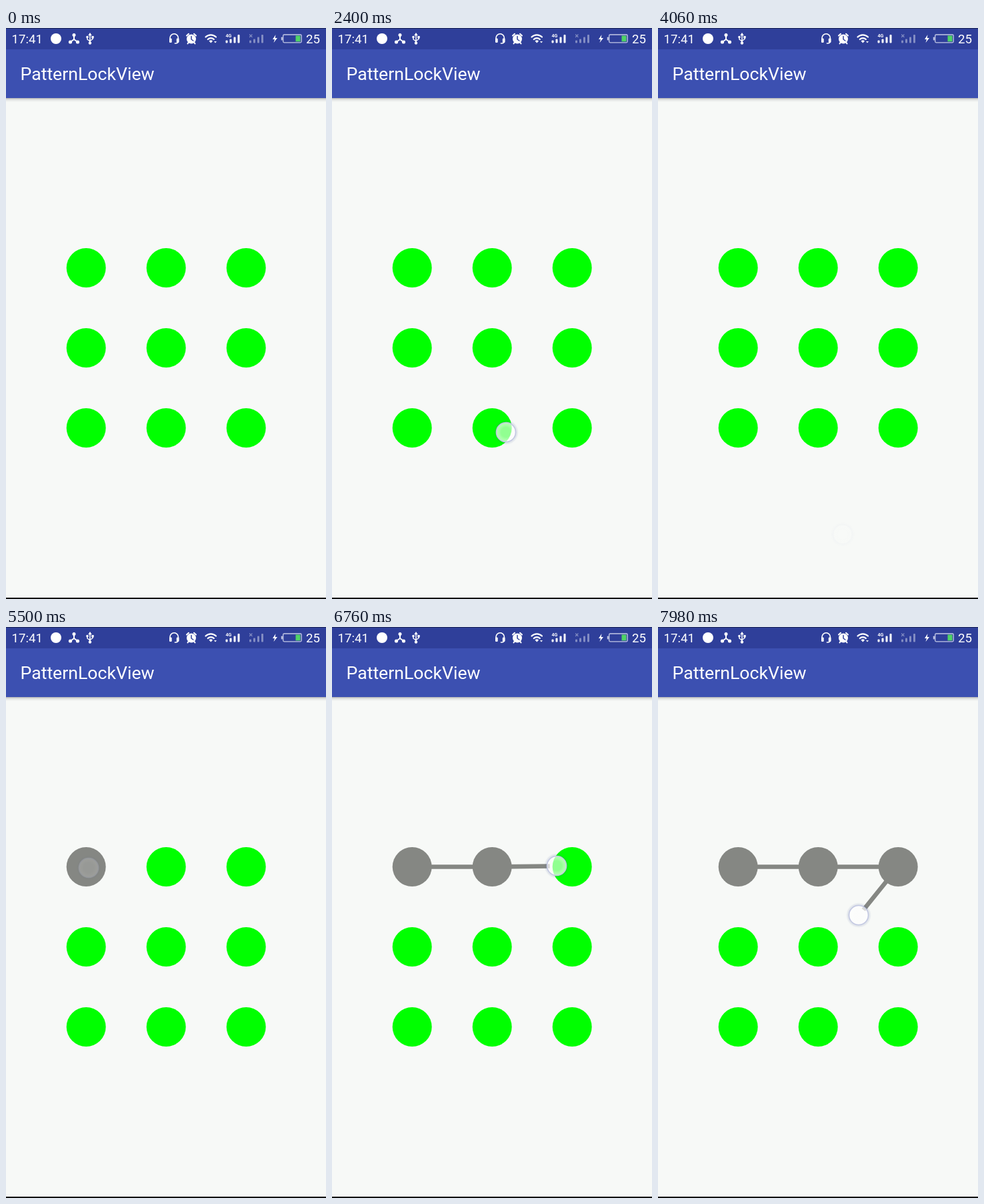
Animation, 480 px wide and 856 px high, one loop 8 s. Source, as an HTML page:

```html
<!DOCTYPE html>
<html lang="en">
<head>
<meta charset="utf-8">
<title>Pattern lock</title>
<style>
  html, body { margin: 0; height: 100%; overflow: hidden; background: #f7f9f7; }
  svg { display: block; width: 100vw; height: 100vh; }
  text { font-family: Roboto, sans-serif; fill: #fff; }
  .status { font-size: 18.67px; }
  .title { font-size: 26.67px; }
  .line { fill: none; stroke: #fff; stroke-linecap: round; stroke-linejoin: round; }
  #trail { fill: none; stroke: #858783; stroke-width: 6.6; }
</style>
</head>
<body>
<svg viewBox="0 0 480 856">
  <defs>
    <linearGradient id="shadow" x2="0" y2="1">
      <stop offset="0" stop-color="#000" stop-opacity=".27"/>
      <stop offset=".4" stop-color="#000" stop-opacity=".09"/>
      <stop offset="1" stop-color="#000" stop-opacity="0"/>
    </linearGradient>
    <radialGradient id="halo">
      <stop offset=".7" stop-color="#4a5f9a" stop-opacity=".25"/>
      <stop offset="1" stop-color="#4a5f9a" stop-opacity="0"/>
    </radialGradient>
    <radialGradient id="glass">
      <stop offset=".5" stop-color="#fff" stop-opacity=".57"/>
      <stop offset="1" stop-color="#fff" stop-opacity=".75"/>
    </radialGradient>
    <mask id="ringOnly">
      <circle r="19" fill="#fff"/><circle r="14" fill="#000"/>
    </mask>
  </defs>

  <rect width="480" height="856" fill="#f7f9f7"/>
  <rect y="105" width="480" height="6" fill="url(#shadow)"/>
  <rect y="32" width="480" height="73" fill="#3c50b1"/>
  <rect width="480" height="32" fill="#2f3f9a"/>
  <rect width="480" height="1" fill="#1c2558"/>
  <rect y="854" width="480" height="2"/>
  <text class="title" x="21.5" y="78">PatternLockView</text>

  <g fill="#fff">
    <text class="status" x="8.5" y="23">17:41</text>
    <text class="status" x="450" y="23">25</text>
    <circle cx="75" cy="16" r="8"/>

    <!-- three linked nodes -->
    <path class="line" stroke-width="2" d="M102 10v7l-5.5 4M102 17l5.5 4"/>
    <circle cx="102" cy="10.5" r="2.5"/>
    <circle cx="96.5" cy="21" r="2.6"/>
    <circle cx="107.5" cy="21" r="2.6"/>

    <!-- cable -->
    <path class="line" stroke-width="1.5" d="M126 10v12M122 14v3l4 3M130 14v2.500l-4 3"/>
    <path d="M126 7l2.800 4.200h-5.600z"/>
    <circle cx="126" cy="22.500" r="2.200"/>
    <circle cx="122" cy="13.500" r="1.800"/>
    <path d="M128.300 12h3.400v3.400h-3.400z"/>

    <!-- headset -->
    <path class="line" stroke-width="1.600" d="M246 17v-2a6.200 6.200 0 0 1 12.400 0v5q0 3-5 3"/>
    <rect x="245" y="15.500" width="3.700" height="6.500" rx="1.300"/>
    <rect x="255.800" y="15.500" width="3.700" height="6.500" rx="1.300"/>

    <!-- alarm -->
    <circle cx="278" cy="16.500" r="7"/>
    <path class="line" stroke-width="2" d="M271 11.500l3-2.800M285 11.500l-3-2.800M273.500 22l-1 1.500M282.500 22l1 1.500"/>
    <path class="line" style="stroke:#2f3f9a" stroke-width="1.500" d="M278 12.500v4.500l2.800 2"/>

    <!-- wireless -->
    <path class="line" stroke-width="2.300" d="M299.500 13.500a11 11 0 0 1 15.500 0M302.800 17a6.300 6.300 0 0 1 9 0"/>
    <path d="M304.500 19.500a4 4 0 0 1 5.600 0l-2.800 3z"/>
    <path d="M312 20h4l-2 2.500z"/>

    <!-- signal -->
    <text x="329.500" y="14" font-size="7" font-weight="700">4G</text>
    <g id="bars">
      <rect x="329.500" y="18.500" width="3" height="4" rx="1"/>
      <rect x="335.500" y="16.500" width="3" height="6" rx="1"/>
      <rect x="341.500" y="13.500" width="3" height="9" rx="1"/>
      <rect x="347.500" y="10" width="3" height="12.500" rx="1"/>
    </g>
    <g opacity=".4">
      <use href="#bars" x="35.500"/>
      <path class="line" stroke-width="1.200" d="M365.500 10l3.500 3.500M369 10l-3.500 3.500"/>
    </g>

    <!-- battery -->
    <path d="M404.500 10l-4.500 7h3l-1.500 5 5.500-7h-3.300z"/>
    <rect class="line" x="415.700" y="10" width="27.500" height="11.800" rx="1.500" stroke-width="1.300" style="stroke:#c5cae6"/>
    <rect x="412.800" y="13.500" width="2" height="5" rx=".8" fill="#c5cae6"/>
    <rect x="434.500" y="11.500" width="7" height="8.800" fill="#4fd366"/>
  </g>

  <path id="trail"/>
  <g id="dots"></g>
  <g id="pointer" opacity="0">
    <circle r="19" fill="url(#halo)" mask="url(#ringOnly)"/>
    <circle r="14.500" fill="url(#glass)" stroke="#c3c8e2" stroke-width="1.600"/>
  </g>
</svg>
<script>
const LOOP = 8000, LAG = 30;
const GREEN = '#00ff00', GRAY = '#858783';
const trail = document.getElementById('trail');
const pointer = document.getElementById('pointer');

// Moments at which the screen stands still for 100 ms
const holds = [2400, 2540, 3380, 6760, 6900, 7740];
const selectAt = [5500, 6430, 6870];

// Each touch: time, x, y
const swipe = [
  [1800, 251, 520], [2400, 261, 606], [2540, 266, 642],
  [2900, 272, 710], [3380, 277, 756], [3700, 277, 759]
];
const draw = [
  [5500, 124, 361], [5900, 134, 365], [6160, 145, 369], [6300, 178, 367],
  [6560, 268, 361], [6760, 337, 358], [6960, 366, 358], [7200, 370, 361],
  [7400, 363, 367], [7740, 336, 389], [7860, 325, 403], [7940, 311, 421],
  [7980, 301, 432]
];

const dots = Array.from({ length: 9 }, (_, i) => {
  const dot = document.createElementNS('http://www.w3.org/2000/svg', 'circle');
  const x = 120.2 + (i % 3) * 120, y = 359.5 + Math.floor(i / 3) * 120;
  for (const [name, value] of Object.entries({ cx: x, cy: y, r: 29.5 })) dot.setAttribute(name, value);
  document.getElementById('dots').append(dot);
  return { dot, x, y };
});

const clamp = v => Math.max(0, Math.min(1, v));
const ramp = (t, from, to) => clamp((t - from) / (to - from));

function locate(path, t) {
  const next = path.findIndex(key => key[0] > t);
  if (next === 0) return path[0].slice(1);
  if (next < 0) return path[path.length - 1].slice(1);
  const a = path[next - 1], b = path[next], k = ramp(t, a[0], b[0]);
  return [a[1] + (b[1] - a[1]) * k, a[2] + (b[2] - a[2]) * k];
}

function pointerOpacity(t) {
  if (t < 4340) return t < 3800 ? ramp(t, 1800, 1900) : 1 - 0.93 * ramp(t, 3800, 4040);
  return ramp(t, 5480, 5560);
}

function render(time) {
  const held = holds.find(h => time >= h && time < h + 100);
  const t = held ?? time;
  const chosen = dots.filter((_, i) => t >= selectAt[i]);
  dots.forEach(({ dot }, i) => dot.setAttribute('fill', t >= selectAt[i] ? GRAY : GREEN));

  const points = chosen.map(({ x, y }) => [x, y]);
  if (points.length) points.push(locate(draw, t - LAG));
  trail.setAttribute('d', points.length ? 'M' + points.join('L') : '');

  const [x, y] = locate(t < 5000 ? swipe : draw, t);
  pointer.setAttribute('transform', `translate(${x} ${y})`);
  pointer.setAttribute('opacity', pointerOpacity(t));
}

function tick() {
  render(performance.now() % LOOP);
  requestAnimationFrame(tick);
}
tick();
</script>
</body>
</html>
```
